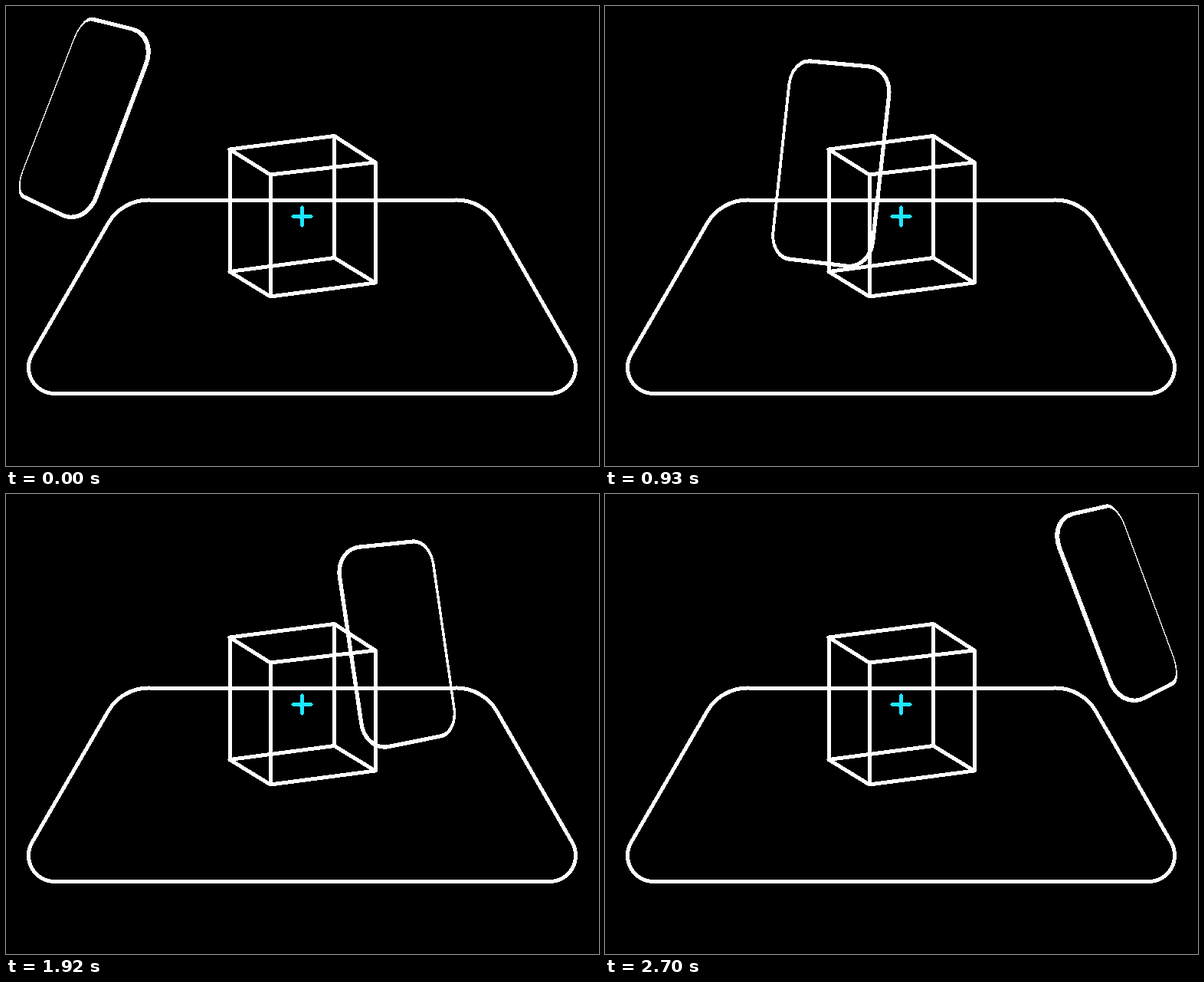
These frames come from a looping animation (774x600 px, 2730 ms). An HTML page:

```html
<!DOCTYPE html>
<html lang="en">
<head>
<meta charset="utf-8">
<title>Scanning a box</title>
<style>
  html, body { margin: 0; width: 100%; height: 100%; overflow: hidden; background: #000; }
  svg { display: block; width: 774px; height: 600px; }
</style>
</head>
<body>
<svg viewBox="0 0 774 600" shape-rendering="crispEdges" fill="none" stroke="#fff" stroke-width="5" stroke-linejoin="round" stroke-linecap="round">
  <path d="M187 253H587A61 61 0 0 1 641 284L739 454.5A34 34 0 0 1 709.5 505.5H63.5A34 34 0 0 1 34 454.5L133 284A61 61 0 0 1 187 253Z"/>
  <path d="M292 187L428.5 169.5L482 204L345 220ZM292 346.5L428.5 328.5L482 361L345 379ZM292 187V346.5M428.5 169.5V328.5M482 204V361M345 220V379"/>
  <g stroke="#1ee6ff" stroke-width="4.5">
    <path d="M374.5 274.5H398.5M386.5 262.5V286.5"/>
    <circle cx="386.5" cy="274.5" r="4" fill="#1ee6ff" stroke="none"/>
  </g>
  <path id="panel" fill="#fff" fill-rule="evenodd" stroke="none"/>
</svg>
<script>
const LOOP = 2730, STEP = 30, MID = 1350;
const panel = document.getElementById('panel');

// Time, then corners clockwise from the top left.
const poses = [
  [0,    100, 14,     197, 38,     103.5, 287,   11, 243],
  [240,  133, 27,     243, 49,     165, 305,     62, 265],
  [630,  194, 51,     316, 68.4,   268, 329.5,   145.5, 301.5],
  [1200, 291.5, 83,   426.5, 88,   415, 350,     282.5, 345],
  [1350, 319.5, 87,   454, 87.5,   453.5, 351.5, 320, 351.5],
  [1650, 377.3, 81.6, 507.6, 75,   526.4, 332.7, 398.5, 345.8],
  [2220, 488.8, 58.7, 600.5, 41,   656, 285,     547.7, 319],
  [2700, 579, 33,     668, 13,     752.5, 241.3, 673.3, 281.5]
];

const slope = (i, k) => (poses[i + 1][k] - poses[i][k]) / (poses[i + 1][0] - poses[i][0]);

function tangent(i, k) {
  if (i === 0) return slope(0, k);
  if (i === poses.length - 1) return slope(i - 1, k);
  const before = poses[i][0] - poses[i - 1][0], after = poses[i + 1][0] - poses[i][0];
  return (slope(i - 1, k) * after + slope(i, k) * before) / (before + after);
}

// Smooth cubic through the poses.
function valueAt(t, k) {
  let i = 0;
  while (i < poses.length - 2 && t >= poses[i + 1][0]) i++;
  const a = poses[i], b = poses[i + 1], span = b[0] - a[0], u = (t - a[0]) / span, v = 1 - u;
  return a[k] * v * v * (1 + 2 * u) + b[k] * u * u * (3 - 2 * u)
    + span * u * v * (tangent(i, k) * v - tangent(i + 1, k) * u);
}

function cross(e, f) {
  const d = e.dx * f.dy - e.dy * f.dx;
  const n = ((f.x - e.x) * f.dy - (f.y - e.y) * f.dx) / d;
  return [e.x + e.dx * n, e.y + e.dy * n];
}

// Rounded outline, pushed outwards (side 1) or inwards (side -1).
function outline(corners, half, cuts, side) {
  const edges = corners.map(([x, y], i) => {
    const [x2, y2] = corners[(i + 1) % 4], len = Math.hypot(x2 - x, y2 - y);
    const dx = (x2 - x) / len, dy = (y2 - y) / len, o = side * half[i];
    return { x: x + dy * o, y: y - dx * o, dx, dy };
  });
  const d = edges.map((e, i) => {
    const j = (i + 3) % 4, p = edges[j], [x, y] = cross(p, e);
    const [du, dv] = cuts[i];
    const r1 = (j % 2 ? dv : du) + side * half[i];
    const r2 = (i % 2 ? dv : du) + side * half[j];
    const at = (g, r) => (x + g.dx * r).toFixed(2) + ' ' + (y + g.dy * r).toFixed(2);
    return `${i ? 'L' : 'M'}${at(p, -r1)}C${at(p, -r1 * 0.448)} ${at(e, r2 * 0.448)} ${at(e, r2)}`;
  });
  return d.join('') + 'Z';
}

// m runs from -1 (far side) to 1 (near side).
const cut = m => [29 + (m < 0 ? 16 : 4) * m, 33 + (m < 0 ? 3 : 7) * m];
const halfWidth = m => (5 + (m < 0 ? 3.7 : 0.8) * m) / 2;

function draw(t) {
  const s = (t - MID) / MID;
  const corners = [1, 3, 5, 7].map(k => [valueAt(t, k), valueAt(t, k + 1)]);
  const half = [2.6, halfWidth(-s), 2.6, halfWidth(s)];
  const left = cut(s), right = cut(-s), cuts = [left, right, right, left];
  panel.setAttribute('d', outline(corners, half, cuts, 1) + outline(corners, half, cuts, -1));
}

const start = performance.now();
function frame() {
  const t = (performance.now() - start) % LOOP;
  draw(Math.floor(t / STEP) * STEP);
  requestAnimationFrame(frame);
}
frame();
</script>
</body>
</html>
```
